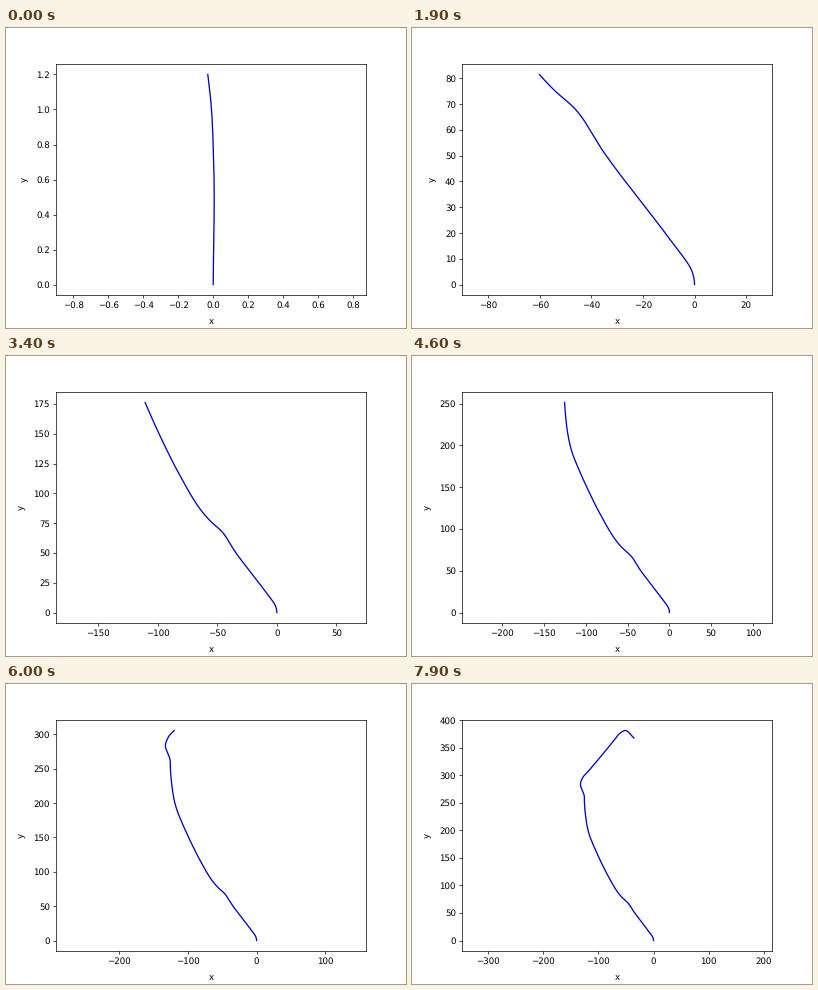
These frames come from a looping animation (400x300 px, 8 s). A matplotlib script:

```python
import numpy as np
import matplotlib.pyplot as plt
from matplotlib.animation import FuncAnimation

FRAMES = 80
INTERVAL = 100
SUB = 10  # track samples per step

# Key poses of the moving head: step, x, y
KEYS = np.array([
    (-1, 0, 0), (-.45, .003, .68), (0, -.031, 1.2), (2, -1.5, 6.3),
    (5, -9.9, 18), (12, -34.7, 50.6), (15.8, -47, 68.8), (17.4, -54, 75),
    (26, -82, 116.2), (34, -110.5, 176.2), (36, -115.3, 188.2),
    (46, -125.4, 251.3), (48.4, -125.6, 261.5), (53.8, -132.4, 285.5),
    (56.3, -128.3, 295.8), (60, -119.8, 305.4), (72, -70, 365.3),
    (73.9, -62.5, 374.8), (75.7, -52, 381), (79, -35.7, 367.6)])


def spline(t, p, q):
    """Smooth curve through points p at times t, sampled at times q."""
    m = np.gradient(p, t, axis=0)
    i = np.clip(np.searchsorted(t, q, side="right") - 1, 0, len(t) - 2)
    h = (t[i + 1] - t[i])[:, None]
    u = (q - t[i])[:, None] / h
    return ((1 + 2 * u) * (1 - u) ** 2 * p[i] + u * (1 - u) ** 2 * h * m[i]
            + u * u * (3 - 2 * u) * p[i + 1] + u * u * (u - 1) * h * m[i + 1])


times = np.linspace(-1, FRAMES - 1, FRAMES * SUB + 1)
track = spline(KEYS[:, 0], KEYS[:, 1:], times)

plt.rcParams["text.hinting"] = "none"
fig, ax = plt.subplots(figsize=(6.4, 4.8), dpi=62.5)
line, = ax.plot([], [], color="#0000c8", lw=1.5)
ax.set_xlabel("x", labelpad=9)
ax.set_ylabel("y", labelpad=9)
ax.axis("equal")


def update(k):
    line.set_data(*track[:(k + 1) * SUB + 1].T)
    ax.relim()
    ax.autoscale_view()
    return line,


anim = FuncAnimation(fig, update, frames=FRAMES, interval=INTERVAL,
                     init_func=lambda: update(0), repeat=True, repeat_delay=0)
plt.show()
```
